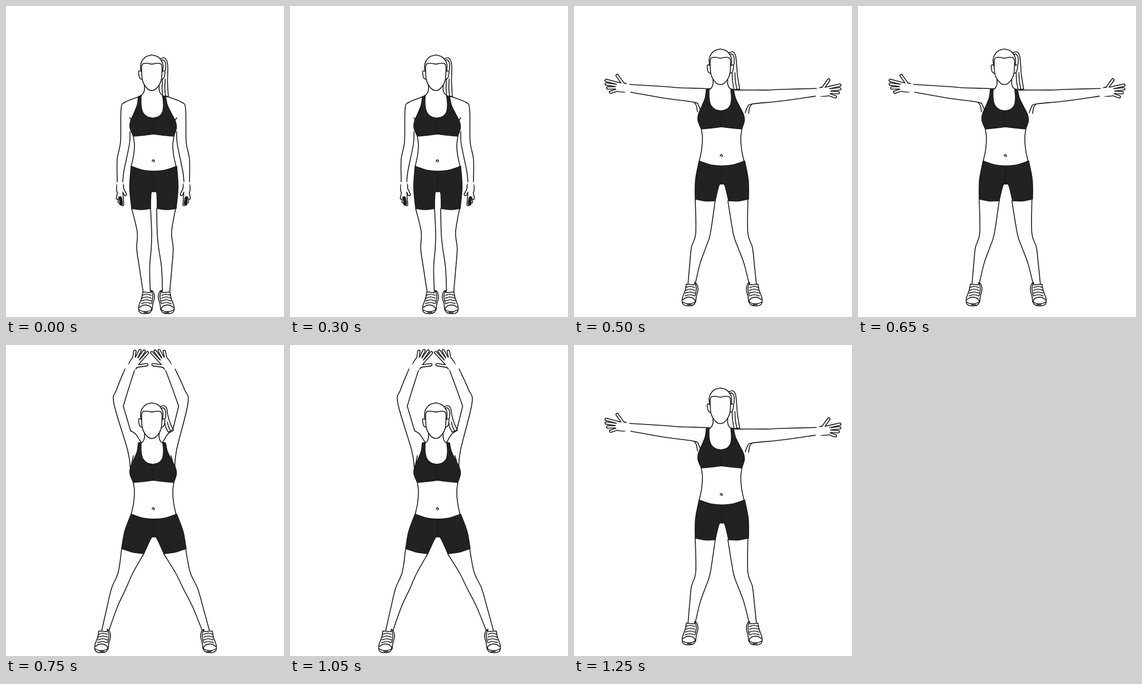
Animation, 500 px wide and 559 px high, one loop 1.5 s. Source, as an HTML page with a canvas:

```html
<!DOCTYPE html>
<html lang="en">
<head>
<meta charset="utf-8">
<title>Jumping jack</title>
<style>
  html, body { margin: 0; width: 100%; height: 100%; overflow: hidden; background: #fff; }
  canvas { display: block; width: 500px; height: 559px; }
</style>
</head>
<body>
<canvas id="stage"></canvas>
<script>
const W = 500, H = 559, LOOP = 1500;
const INK = '#1b1b1b', CLOTH = '#222', SKIN = '#fff';
const canvas = document.getElementById('stage');
const ctx = canvas.getContext('2d');
const dpr = window.devicePixelRatio || 1;
canvas.width = W * dpr;
canvas.height = H * dpr;

const lerp = (a, b, t) => a + (b - a) * t;
const mix = (p, q, t) => [lerp(p[0], q[0], t), lerp(p[1], q[1], t)];
const move = (p, dx, dy = 0) => [p[0] + dx, p[1] + dy];
const parse = text => text.split(' ').map(p => p.split(',').map(Number));

// Each part is a smooth run of points; parts meet in sharp corners.
function trace(...parts) {
  const path = new Path2D();
  let last = null;
  for (const part of parts) {
    const pts = typeof part === 'string' ? parse(part) : [...part];
    if (last) pts.unshift(last);
    else path.moveTo(...pts[0]);
    for (let i = 0; i < pts.length - 1; i++) {
      const b = pts[i], c = pts[i + 1];
      const a = pts[i - 1] || b, d = pts[i + 2] || c;
      path.bezierCurveTo(
        b[0] + (c[0] - a[0]) / 6, b[1] + (c[1] - a[1]) / 6,
        c[0] - (d[0] - b[0]) / 6, c[1] - (d[1] - b[1]) / 6, ...c);
    }
    last = pts[pts.length - 1];
  }
  return path;
}

function line(...parts) {
  ctx.stroke(trace(...parts));
}

function shape(color, ...parts) {
  const path = trace(...parts);
  path.closePath();
  ctx.fillStyle = color;
  ctx.fill(path);
  ctx.stroke(path);
}

function within(matrix, draw) {
  ctx.save();
  ctx.transform(...matrix);
  draw();
  ctx.restore();
}

const shift = (x, y) => [1, 0, 0, 1, x, y];

// Mirror where x and its image add up to sum at height y0, drifting by lean.
const mirror = (sum, lean = 0, y0 = 0) => [-1, 0, lean, 1, sum - lean * y0, 0];

function both(matrix, draw) {
  draw();
  within(matrix, draw);
}

const stand = {
  head: [0, 0], tail: [292, 163], chest: 0, hips: 0,
  hem: [[226, 364], [260, 364]], crotch: 334, knee: [249, 406], feet: [253, 288, 512],
  arm: [
    '244,161 239,163 214,173 207,185 206,244 200,275 200,316',
    '223,226 222,248 212,297 210,316',
    '223,201 227,207'
  ],
  hand: { at: [205, 314], angle: 88, side: -1, spread: .45, shade: true },
  armMirror: mirror(530)
};

const wide = {
  head: [1, -10.7], tail: [297, 160], chest: -13, hips: -9.5,
  hem: [[218, 347], [254, 350]], crotch: 320, knee: [232, 408], feet: [209, 324, 498],
  arm: [
    '246,149 225,148 190,147 165,145 100,141',
    '102,155 165,166 216,173 224,179 228,189',
    '216,173 220,179 222,190'
  ],
  hand: { at: [99, 148], angle: 190, side: 1, spread: 1 },
  armMirror: [-1, -.034, 0, 1, 536, 10.6]
};

const reach = {
  head: [0, 16], tail: [301, 137], chest: 13, hips: 16,
  hem: [[208, 366], [248, 375]], crotch: 345, knee: [215, 408], feet: [174, 364, 512],
  arm: [
    '214,43 199,80 194,105 219,190 224,226',
    '231,46 220,80 211,110',
    '211,110 224,154',
    '224,154 233,160 243,175',
    '229,199 225,219'
  ],
  hand: { at: [223, 44], angle: -53, side: 1, spread: 1 },
  armMirror: mirror(516, .05)
};

function drawHead() {
  both(mirror(524.5), () => {
    line('262,88 252,91 245,98 242,107 243,118');
    line('262,104.5 253,103 246,104 244,109 244,118 245,132 249,142 256,150 262,152');
    line('243,117 239,117 239,124 241,130 245,132');
    line('249,143 249,151 246,158 239,163');
  });
}

function drawTail(end) {
  const root = [291, 110];
  const dx = end[0] - root[0], dy = end[1] - root[1];
  const gap = 5 / Math.hypot(dx, dy);
  const aside = (p, i) => move(p, -dy * gap * i, dx * gap * i);
  line([[277, 95], [284, 93], [289, 98], root, move(mix(root, end, .5), -1), end]);
  line('279,98 283,97 287,103 287,116');
  for (const i of [1, 2]) {
    const from = aside(mix(root, end, .4), i), to = aside(end, i);
    line([from, move(mix(from, to, .5), -1), to]);
  }
  line([end, aside(end, 2)]);
}

function drawHand({ at, angle, side, spread, shade }) {
  const segment = (x1, y1, x2, y2, width) => ({ x1, y1: y1 * spread, x2, y2: y2 * spread, width });
  const palm = segment(9, 0, 17, -1, 11 + 7 * spread);
  const digits = [segment(10, 4, 25, 19, 6)];
  for (let i = 0; i < 4; i++) {
    digits.push(segment(19, 5 - 3.7 * i, 43 - 1.3 * i * i, 7 - 6.5 * i, 5.8));
  }
  const pass = (s, color, inset, back = 0) => {
    ctx.strokeStyle = color;
    ctx.lineWidth = s.width - inset;
    line([[s.x1 - back, s.y1], [s.x2, s.y2]]);
  };

  ctx.save();
  ctx.translate(...at);
  ctx.rotate(angle * Math.PI / 180);
  ctx.scale(1, side);
  [palm, ...digits].forEach(s => pass(s, INK, 0));
  [palm, ...digits].forEach(s => pass(s, SKIN, 3.2, s === palm ? 6 : 0));
  if (shade) pass(segment(31, -1, 41, 2, 6), INK, 0);
  ctx.restore();
}

function drawChest(dy) {
  within(shift(0, dy), () => both(mirror(525, .08, 163), () => shape(CLOTH,
    '238,163 236,178 230,193 224,207 223,219 229,234',
    '246,232.5 266,230', '266,202', '254,199 246,191 243,178 243,162')));
}

function drawTorso({ chest, hips }) {
  both(mirror(531), () => line(
    [[229, 234 + chest], [231, 250 + chest], [229.5, 268 + hips], [225, 289 + hips]]));
  ctx.beginPath();
  ctx.arc(265, 278.5 + hips, 1.8, 2.8, 7.6);
  ctx.stroke();
}

function drawShorts({ hips, hem: [outer, inner], crotch }) {
  const hip = [225, 288 + hips];
  both(mirror(532), () => shape(CLOTH,
    [hip, move(mix(hip, outer, .5), -3), outer],
    [move(mix(outer, inner, .5), 0, 2), inner],
    [[261, crotch + 2], [267, crotch]],
    [[267, 297 + hips]],
    [[246, 295 + hips], hip]));
}

function drawLegs({ hem: [outer, inner], knee, feet: [left, right, top] }) {
  const ankle = [left + (253 - left) * .06, top + 1];
  const calf = mix(knee, ankle, .28), shin = mix(knee, ankle, .6);
  both(mirror(531, (left + right - 531) / (top - 364), 364), () => {
    line([outer, move(knee, -13), move(calf, -15), move(shin, -11.5), move(ankle, -6.5)]);
    line([inner, move(knee, 13, 2), move(calf, 11), move(shin, 7), move(ankle, 6.5)]);
  });
}

function drawShoe() {
  shape(SKIN, '-7,2 -9,13 -14,27 -14,36 -10,40 -2,41 6,39 10,33',
    '11,24 14,12 12,2 8,-1', '7,3 -7,2');
  line('-13,30 -7,26 2,26 8,30 9,35');
  line('-14,34 -7,37 2,37 9,34');
  line('9,0 11,10 9,22');
  for (let y = 7; y < 25; y += 5) {
    line([[-7 - y / 10, y + 1], [0, y - 1], [8, y + 1]]);
  }
  line('-5,39 2,39');
}

function drawPose(pose) {
  ctx.setTransform(dpr, 0, 0, dpr, 0, 0);
  ctx.fillStyle = SKIN;
  ctx.fillRect(0, 0, W, H);
  ctx.strokeStyle = INK;
  ctx.lineWidth = 1.6;
  ctx.lineCap = ctx.lineJoin = 'round';

  both(pose.armMirror, () => {
    drawHand(pose.hand);
    pose.arm.forEach(part => line(part));
  });
  within(shift(...pose.head), () => {
    drawTail(pose.tail);
    drawHead();
  });
  drawTorso(pose);
  drawLegs(pose);
  drawChest(pose.chest);
  drawShorts(pose);

  const [left, right, top] = pose.feet;
  within(shift(left, top), drawShoe);
  within([-1, 0, 0, 1, right, top], drawShoe);
}

function poseAt(ms) {
  if (ms < 500) return stand;
  return ms >= 750 && ms < 1250 ? reach : wide;
}

let shown = null;
const start = performance.now();
function tick() {
  const pose = poseAt((performance.now() - start) % LOOP);
  if (pose !== shown) drawPose(shown = pose);
  requestAnimationFrame(tick);
}
tick();
</script>
</body>
</html>
```
